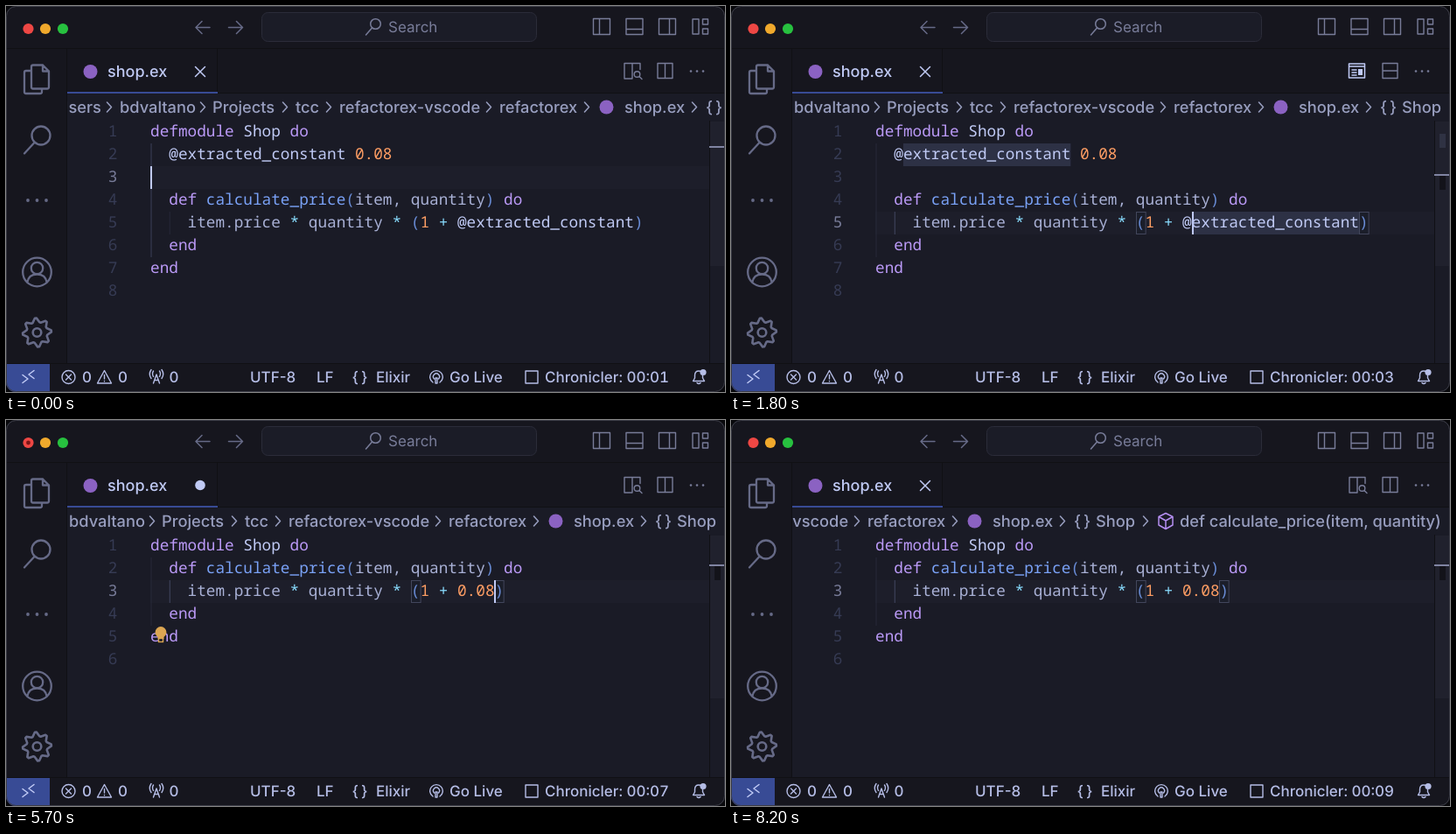
These frames come from a looping animation (822x441 px, 8400 ms). An HTML page:

```html
<!DOCTYPE html>
<html lang="en">
<head>
<meta charset="utf-8">
<title>Inline constant</title>
<style>
html, body { margin: 0; width: 100%; height: 100%; overflow: hidden; background: #08080b; }
svg { display: block; width: 822px; height: 441px; font-weight: 500; }
text { white-space: pre; text-rendering: geometricPrecision; font-family: Inter, "Open Sans", sans-serif; }
.mono text { font: 500 17.725px "Noto Sans Mono", "DejaVu Sans Mono", monospace; }
.ico { fill: none; stroke-linecap: round; stroke-linejoin: round; }
#clock { font-variant-numeric: tabular-nums; }
</style>
</head>
<body>
<svg id="stage" viewBox="0 0 822 441"></svg>
<script>
const C = {
  bar: '#16161e', editor: '#1a1b26', edge: '#101014', row: '#1d1e2a', text: '#c0caf5', soft: '#a9b1d6',
  status: '#b5bde6', crumb: '#989ebf', grey: '#787c99', dim: '#666a87', faint: '#363b54', blue: '#384b95',
  key: '#bb9af7', fn: '#7aa2f7', num: '#ff9e64', op: '#89ddff', paren: '#698cd6', bulb: '#dca652', purple: '#8b62c2'
};
const CW = 10.635, LEFT = 165, TOP = 131, ROW = 26, LOOP = 8400;
const colX = c => LEFT + c * CW, rowY = n => TOP + (n - 1) * ROW;

const txt = (x, y, s, fill, size = 18, extra = '') =>
  `<text x="${x}" y="${y}" fill="${fill}" font-size="${size}" ${extra}>${s}</text>`;
const rect = (x, y, w, h, fill, extra = '') =>
  `<rect x="${x}" y="${y}" width="${w}" height="${h}" fill="${fill}" ${extra}/>`;
const dot = (x, y, r, fill, extra = '') => `<circle cx="${x}" cy="${y}" r="${r}" fill="${fill}" ${extra}/>`;
const ico = (d, color, w = 1.5) => `<path class="ico" d="${d}" style="stroke:${color};stroke-width:${w}"/>`;
const ring = (x, y, r) => `M${x - r} ${y}a${r} ${r} 0 1 0 ${2 * r} 0a${r} ${r} 0 1 0 ${-2 * r} 0`;
const box = (x, y, w, h) => `M${x} ${y}h${w}v${h}h${-w}z`;
const group = (id, body) => `<g id="${id}">${body}</g>`;
const dots = (x, y, gap, r, fill) => [-1, 0, 1].map(i => dot(x + i * gap, y, r, fill)).join('');

function gear(x, y) {
  let d = '';
  for (let i = 0; i < 32; i++) {
    const r = (i + 1) % 4 < 2 ? 16.4 : 12;
    const a = (i + (i % 2 ? 0.2 : -0.2)) * Math.PI / 16;
    d += `${i ? 'L' : 'M'}${(x + r * Math.cos(a)).toFixed(2)} ${(y + r * Math.sin(a)).toFixed(2)}`;
  }
  return d + 'z' + ring(x, y, 4.8);
}

// --- code ---
const before = ['defmodule Shop do', '  @extracted_constant 0.08', '',
  '  def calculate_price(item, quantity) do',
  '    item.price * quantity * (1 + @extracted_constant)', '  end', 'end', ''];
const after = [before[0], before[3], '    item.price * quantity * (1 + 0.08)', '  end', 'end', ''];

const rules = [
  [/^(defmodule|def|do|end)$/, C.key], [/^calculate_price$/, C.fn], [/^\d[\d.]*$/, C.num],
  [/^[*+]$/, C.op], [/^[()]$/, C.paren], [/^(@\w+|Shop)$/, C.text]
];
function paint(line, i) {
  const parts = line.match(/@?[A-Za-z_]+|\d[\d.]*|\s+|./g) || [];
  const spans = parts.map(p => {
    const rule = rules.find(r => r[0].test(p));
    return `<tspan fill="${rule ? rule[1] : C.soft}">${p}</tspan>`;
  });
  return `<text x="${LEFT}" y="${rowY(i + 1) + 18}">${spans.join('')}</text>`;
}
const listing = lines => lines.map(paint).join('');
const guide = (id, col, from, to) =>
  rect(colX(col) + 0.5, rowY(from), 1, (to - from + 1) * ROW, '#262838', `id="${id}"`);
const frame = id => rect(0, 0, CW, ROW - 1, '#1b1e2a', `id="${id}" stroke="#42465c"`);

// --- window parts ---
const titleBar = rect(0, 0, 822, 49, C.bar) + rect(0, 48, 822, 1, C.edge) +
  dot(25.5, 26, 6.1, '#ee4744') + dot(25.5, 26, 2.4, '#7c1516', 'id="edited"') +
  dot(45, 26, 6.1, '#f0a92c') + dot(65, 26, 6.1, '#27c13f') +
  ico('M233 24.500h-16m7-7l-7 7 7 7M254.500 24.500h16m-7-7l7 7-7 7', C.dim) +
  rect(292.5, 7.5, 314, 33, '#1b1c27', 'rx="7" stroke="#2b2c39"') +
  ico(ring(422.5, 20.5, 5.8) + 'M418.500 25l-7 8', C.grey) + txt(437, 30, 'Search', C.grey, 17, 'font-weight="400"') +
  ico(box(671.5, 14.5, 19, 18) + 'M678.5 14.5v18' + box(709, 14.5, 19, 18) + 'M709 26.5h19' +
    box(746.5, 14.5, 19, 18) + 'M758.5 14.5v18' +
    box(785, 15, 7, 17) + box(796.5, 15, 6, 6) + box(796.5, 26, 6, 6), C.grey, 1.4);

const activity = rect(0, 49, 70, 360, C.bar) + rect(69, 49, 1, 360, C.edge) +
  ico('M31 67.500h11l7 7v18q0 2-2 2H31q-2 0-2-2v-23q0-2 2-2zM42 67.500v7h7M29 74h-6q-2 0-2 2v22q0 2 2 2h16q2 0 2-2v-3.500', C.dim, 2.3) +
  ico(ring(40, 148, 10.5) + 'M32.500 156L21 168.500', C.dim, 2.3) + dots(35.5, 222, 10.5, 1.9, C.dim) +
  ico(ring(35.5, 304, 16.3) + ring(35.5, 299.5, 6.7) + 'M24.500 316q1-9.500 11-9.500t11 9.500', C.dim, 2.3) +
  ico(gear(35.5, 373), C.dim, 2.6) +
  group('badge', dot(47, 96, 11.5, C.blue) + txt(47, 100.5, '1', '#fff', 12.5, 'text-anchor="middle" font-weight="700"'));

const tabs = rect(70, 49, 752, 51, C.bar) + rect(242, 99, 580, 1, C.edge) + rect(241, 49, 1, 50, C.edge) +
  rect(70, 98, 172, 2, C.blue) +
  dot(96.5, 75, 8, C.purple) + txt(116, 81, 'shop.ex', C.text) +
  group('close', ico('M216.500 69.500l11 11m0-11l-11 11', C.text)) + dot(222, 74.5, 5.8, C.text, 'id="dirty"') +
  group('tools', ico('M716 83h-9V65.500h18v7M716 65.500V83' + ring(721.5, 78, 3.3) + 'M724 80.500l3 3' +
    box(745, 65.5, 17, 17) + 'M753.5 65.5v17', C.grey, 1.4)) +
  group('altTools', ico(box(706.5, 66, 18, 16) + 'M707 69h17M710 73h5M710 76h5M710 79h5', C.text) +
    rect(717, 72, 5, 7, C.text) + ico(box(745, 65.5, 17, 17) + 'M745 74h17', C.grey, 1.4)) +
  dots(790, 74.5, 7, 1.3, C.grey);

const chevron = x => `M${x - 2.5} 110l5 5.500-5 5.500`;
const crumb = (x, s) => txt(x, 121.5, s, C.crumb, 18.25);
const crumbs = rect(70, 100, 752, 31, C.editor) + '<g clip-path="url(#crumbClip)">' + group('crumbs',
  crumb(0, 'Users') + crumb(72, 'bdvaltano') + crumb(178, 'Projects') + crumb(273, 'tcc') +
  crumb(323, 'refactorex-vscode') + crumb(506, 'refactorex') + dot(628.5, 115.5, 8, C.purple) +
  crumb(649, 'shop.ex') + crumb(742, '{') + crumb(753, '}') + crumb(767, 'Shop') +
  ico([60, 167, 261, 311, 494, 606, 729].map(chevron).join(''), C.crumb) +
  group('defCrumb', crumb(863, 'def calculate_price(item, quantity)') + ico(chevron(824), C.crumb) +
    ico('M847 106.500l8 4v9.500l-8 4.500-8-4.500v-9.500zM839 110.500l8 4.500 8-4.500M847 115v9.500', '#b48ef0'))) + '</g>';

const bulb = (x, y) => dot(x, y - 2.5, 6.4, C.bulb) + rect(x - 3.5, y + 1, 7, 4, C.bulb) +
  rect(x - 2.5, y + 4.5, 5, 4, C.editor, `stroke="${C.bulb}" stroke-width="1.4"`);

const editor = rect(70, 131, 752, 278, C.editor) +
  rect(LEFT, 0, 639, ROW, C.row, 'id="rowLight"') +
  guide('outer', 0, 2, 6) + guide('inner', 2, 5, 5) +
  group('words', rect(colX(3), rowY(2), 18 * CW, ROW, '#2d3145') + rect(colX(34), rowY(5), 18 * CW, ROW, '#2d3145')) +
  group('names', rect(colX(2), rowY(2), 19 * CW, ROW, '#20222f') + rect(colX(33), rowY(5), 19 * CW, ROW, '#20222f')) +
  frame('open') + frame('shut') +
  '<g class="mono">' + group('numbers', before.map((_, i) =>
    `<text x="127.500" y="${rowY(i + 1) + 18}" text-anchor="end">${i + 1}</text>`).join('')) +
  group('before', listing(before)) + group('after', listing(after)) + '</g>' +
  rect(0, 0, 2, ROW, C.text, 'id="cursor"') + group('bulb', bulb(177, 245)) +
  rect(804, 131, 1, 278, C.edge) + rect(805, 132, 17, 0, '#20212d', 'id="slider"') +
  rect(810, 146, 7, 16, '#2f3243', 'id="wordMark"') + rect(810, 0, 7, 17, '#13131a', 'id="pairMark"') +
  rect(804, 0, 18, 2, '#8084a2', 'id="lineMark"');

const label = (x, s, extra = '') => txt(x, 430, s, C.status, 17, extra);
const status = rect(0, 408, 822, 33, C.bar) + rect(0, 408, 822, 1, C.edge) +
  rect(0, 409, 50, 32, C.blue) + ico('M19 421.500l6 4.500-6 4.500M32 416.500l-6 4.500 6 4.500', C.text) +
  label(87, '0') + label(128, '0') + label(186.5, '0') + label(279, 'UTF-8') + label(355, 'LF') +
  label(395.5, '{') + label(406, '}') + label(423, 'Elixir') + label(507, 'Go Live') +
  label(616, 'Chronicler: 00:01', 'id="clock"') +
  ico(ring(71.5, 424, 7.5) + 'M68.500 421l6 6m0-6l-6 6' +
    'M112.500 416.500l8 14.500h-16zM112.500 421.500v4.500M112.500 428.500v.3' +
    'M168.500 431l3.500-10 3.500 10M170 427.500h4M168.500 423.500q-2-3.500 0-6.500M175.500 423.500q2-3.500 0-6.500M166 425.500q-3.500-5 0-10M178 425.500q3.500-5 0-10' +
    'M488 430a7.300 7.300 0 1 1 8 0M489.500 426a3.500 3.500 0 1 1 5 0M491 425h2v6h-2z' +
    box(594, 417, 14, 14) +
    'M785.500 428.500h13l-2-3.500v-3q0-5-4.500-5t-4.500 5v3zM790 430.500q2 2 4 0', C.status, 1.4) +
  dot(797, 418.5, 3.6, C.status);

const wrench = y => `M540 ${y + 6}l8-8q-1.500-6 3.500-8.500 2-.8 4 0l-4 4 .8 3 3 .8 4-4q1 5-2 7.500-3 2-5.500 1l-8 8q-2 1-3.500-.3t-.3-3.500z`;
const choices = [['Quick Fix', 'Introduce IO.inspect', 94], ['Extract', 'Extract variable', 166], ['Inline', 'Inline constant', 238]];
const menu = group('menu', rect(517.5, 32.5, 252, 229, C.bar, 'rx="7" stroke="#33343f" filter="url(#shade)"') +
  rect(523, 0, 240, 35, '#1f2130', 'rx="5" id="pick"') +
  choices.map(([head, item, y], i) =>
    txt(537.5, y - (i ? 27 : 30), head, '#474b64', 17.4, 'font-weight="600"') +
    txt(572, y + 6, item, C.grey, 18, `id="item${i}"`) +
    (i ? ico(wrench(y), C.grey).replace('<path', `<path id="tool${i}"`) : bulb(549.5, y - 0.5))).join(''));

const stage = document.getElementById('stage');
stage.innerHTML = `<defs><clipPath id="win">${rect(0, 0, 822, 441, '#000', 'rx="11"')}</clipPath>
  <clipPath id="crumbClip">${rect(70, 100, 752, 31, '#000')}</clipPath>
  <filter id="shade" x="-10%" y="-10%" width="120%" height="125%"><feDropShadow dx="0" dy="1" stdDeviation="4" flood-opacity=".45"/></filter></defs>
  <g clip-path="url(#win)">${titleBar + activity + tabs + crumbs + editor + status + menu}</g>
  ${rect(0.5, 0.5, 821, 440, 'none', 'rx="11" stroke="#3b3c46"')}`;

// --- timeline: [ms, changes]; "at" restarts the cursor blink ---
const steps = [
  [0, { line: 3, col: 0, at: 0, pick: 0 }],
  [300, { line: 4, at: 300 }],
  [500, { line: 5, at: 500 }],
  [700, { col: 53, at: 700 }],
  [900, { col: 52, at: 900, pair: 52 }],
  [1700, { col: 34, at: 1700, alt: true }],
  [1800, { words: true }],
  [1900, { alt: false, pair: 0 }],
  [2100, { col: 33, at: 2100, words: false, names: true }],
  [2500, { alt: true }],
  [3000, { menu: true, bulb: true }],
  [3900, { pick: 1 }],
  [4700, { pick: 2 }],
  [5700, { menu: false, alt: false, names: false, done: true, dirty: true, line: 3, col: 37, at: 5700, pair: 37 }],
  [5800, { def: true }],
  [5900, { badge: true }],
  [6300, { bulb: false }],
  [7000, { dirty: false, badge: false }]
];
const ease = (t, from, to) => {
  const p = Math.min(1, Math.max(0, (t - from) / (to - from)));
  return 1 - (1 - p) ** 3;
};
const $ = {};
stage.querySelectorAll('[id]').forEach(el => { $[el.id] = el; });
const show = (id, on) => $[id].setAttribute('visibility', on ? 'visible' : 'hidden');
const set = (id, attrs) => { for (const k in attrs) $[id].setAttribute(k, attrs[k]); };

function draw(t) {
  const s = {};
  for (const [at, change] of steps) if (t >= at) Object.assign(s, change);
  const y = rowY(s.line), done = !!s.done;

  show('before', !done);
  show('after', done);
  set('rowLight', { y });
  [...$.numbers.children].forEach((n, i) => {
    n.setAttribute('fill', i + 1 === s.line ? C.grey : C.faint);
    n.setAttribute('visibility', done && i > 5 ? 'hidden' : 'visible');
  });
  const inside = s.line === (done ? 3 : 5);
  set('outer', { height: (done ? 3 : 5) * ROW, fill: inside ? '#262838' : '#3b4058' });
  set('inner', { y: rowY(done ? 3 : 5), fill: inside ? '#434860' : '#262838' });

  set('cursor', { x: Math.round(colX(s.col)), y });
  show('cursor', Math.floor((t - s.at) / 500) % 2 === 0);
  show('words', s.words);
  show('names', s.names);
  for (const [id, col] of [['open', 28], ['shut', s.pair]]) {
    show(id, s.pair);
    set(id, { x: Math.round(colX(col || 0)) + 0.5, y: y + 0.5 });
  }

  const mark = done ? 165 : { 3: 160, 4: 176, 5: 192 }[s.line];
  set('lineMark', { y: mark });
  set('pairMark', { y: mark + 1 });
  show('pairMark', s.pair);
  show('wordMark', s.words);
  set('slider', { height: done ? 186 : 165 });

  set('crumbs', { transform: `translate(${58 * (1 - ease(t, 100, 300)) - 350 * ease(t, 5800, 6000)} 0)` });
  show('defCrumb', s.def);
  show('tools', !s.alt);
  show('altTools', s.alt);
  show('bulb', s.bulb);
  show('badge', s.badge);
  for (const id of ['dirty', 'edited']) show(id, s.dirty);
  show('close', !s.dirty);

  show('menu', s.menu);
  set('pick', { y: choices[s.pick][2] - 18 });
  choices.forEach((_, i) => {
    const color = i === s.pick ? C.text : C.grey;
    set('item' + i, { fill: color });
    if (i) $['tool' + i].style.stroke = color;
  });
  $.clock.textContent = 'Chronicler: 00:0' + (1 + Math.floor((t + 500) / 1000));
}

const start = performance.now();
function tick() {
  draw((performance.now() - start) % LOOP);
  requestAnimationFrame(tick);
}
tick();
</script>
</body>
</html>
```
